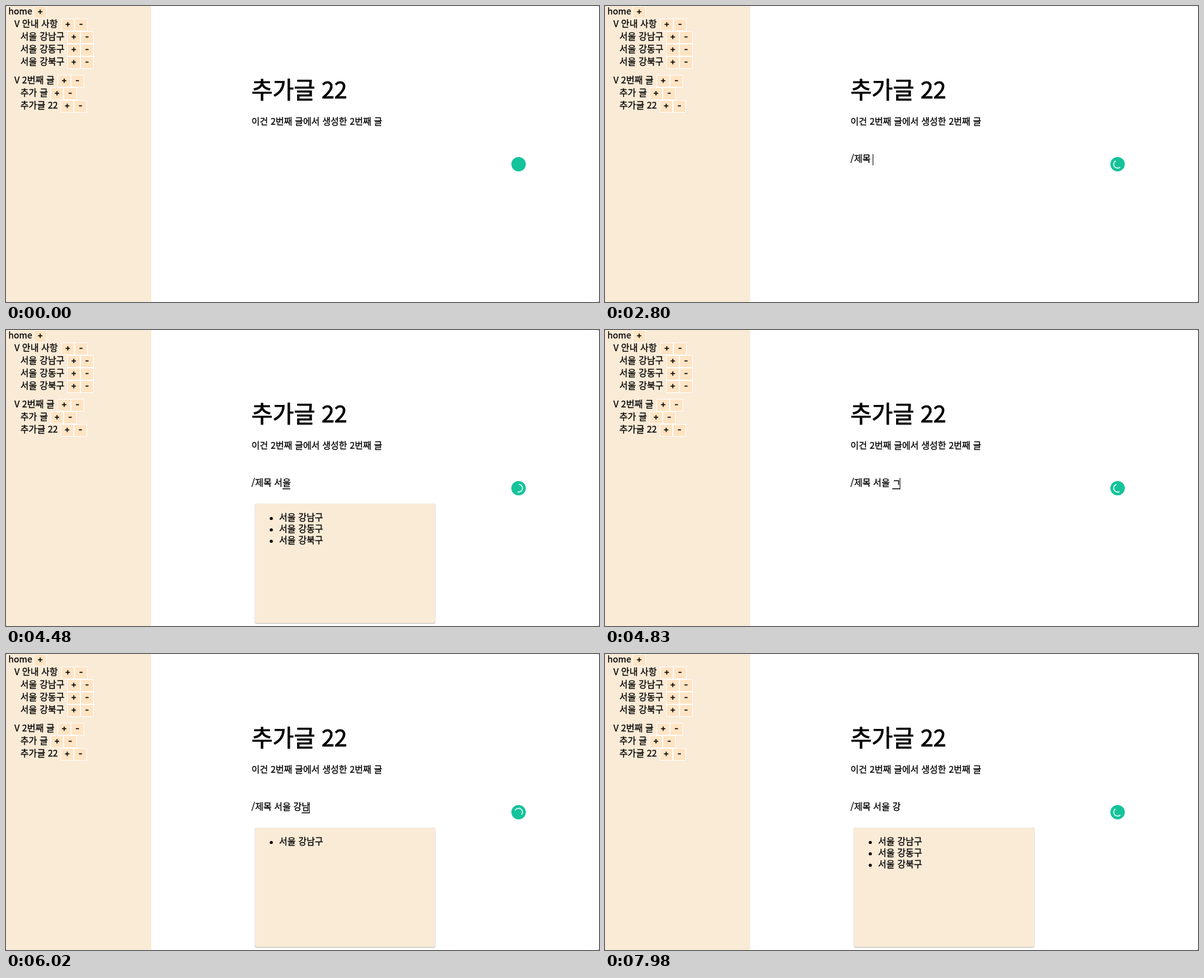
Write an HTML page that moves like this. It is 988 by 494 pixels and loops after 8000 ms.

```html
<!DOCTYPE html>
<html lang="ko">
<head>
<meta charset="utf-8">
<title>글 편집기</title>
<style>
  html, body { margin: 0; width: 100%; height: 100%; overflow: hidden; background: #777; }
  #page { position: relative; width: 988px; height: 494px; overflow: hidden; border-radius: 2px; background: #fff; }
  svg { position: absolute; left: 0; top: 0; }
  text {
    font: 15.05px "Noto Sans CJK KR", "Noto Sans KR", "Noto Sans CJK", sans-serif;
    fill: #000; stroke: #000; stroke-width: .3px; white-space: pre;
  }
  .title { font-size: 38.4px; stroke-width: .9px; }
  .home { font-size: 14.7px; }
  .sign { font: 500 14px Inter, sans-serif; text-anchor: middle; }
  .button { fill: bisque; stroke: #fff; }
  #popup {
    position: absolute; left: 415px; top: 290px; width: 300px; height: 199px;
    background: antiquewhite; border-radius: 3px;
    box-shadow: 0 1px 2px rgba(0, 0, 0, .28), 0 0 1px rgba(0, 0, 0, .3);
  }
</style>
</head>
<body>
<div id="page">
  <div id="popup"></div>
  <svg width="988" height="494" viewBox="0 0 988 494">
    <rect width="242" height="494" fill="antiquewhite"/>
    <g id="menu"></g>
    <text class="title" x="409" y="154">추가글 22</text>
    <text x="409" y="198">이건 2번째 글에서 생성한 2번째 글</text>
    <text id="typed" x="409" y="260.3"></text>
    <rect id="underline" y="264.3" height="1.5"/>
    <rect id="caret" width="1" height="19"/>
    <g id="list"></g>
    <circle cx="854" cy="264" r="12" fill="#15c39a"/>
    <path id="spinner" d="M860.5 264A6.5 6.5 0 0 1 847.5 264"
          fill="none" stroke="#fff" stroke-opacity=".85" stroke-width="1.8" stroke-linecap="round"/>
  </svg>
</div>
<script>
const LOOP = 8000, STEP = 70, BLINK = 500, EM = 15.1;
const $ = id => document.getElementById(id);

function add(parent, tag, attrs, content = "") {
  const el = document.createElementNS("http://www.w3.org/2000/svg", tag);
  for (const key in attrs) el.setAttribute(key, attrs[key]);
  el.textContent = content;
  parent.append(el);
  return el;
}

// label, text x, row y, first button x, button signs
const rows = [
  ["home", 4, 0, 46, "+"],
  ["V 안내 사항", 14, 21, 92, "+-"],
  ["서울 강남구", 24, 42, 102, "+-"],
  ["서울 강동구", 24, 63, 102, "+-"],
  ["서울 강북구", 24, 84, 102, "+-"],
  ["V 2번째 글", 14, 115, 86, "+-"],
  ["추가 글", 24, 136, 74, "+-"],
  ["추가글 22", 24, 157, 91, "+-"]
];
for (const [label, x, y, left, signs] of rows) {
  add($("menu"), "text", { x, y: y + 14, class: label === "home" ? "home" : "" }, label);
  [...signs].forEach((sign, i) => {
    const bx = left + i * 22;
    add($("menu"), "rect", { x: bx + .5, y: y + .5, width: 21, height: 20, class: "button" });
    add($("menu"), "text", { x: bx + 11, y: y + 13.7, class: "sign" }, sign);
  });
}

const districts = ["서울 강남구", "서울 강동구", "서울 강북구"];
const items = districts.map((name, i) => {
  const item = add($("list"), "g", {});
  add(item, "circle", { cx: 442, cy: 314.5 + i * 19, r: 2.6 });
  add(item, "text", { x: 455, y: 318.3 + i * 19 }, name);
  return item;
});

// time, text, whether the last syllable is still being composed
const edits = [
  [0, ""], [1680, "/"], [1960, "/ㅈ", 1], [2100, "/제", 1], [2240, "/젬", 1],
  [2380, "/제모", 1], [2520, "/제목", 1], [2800, "/제목 "], [3080, "/제목 ㅅ", 1],
  [3430, "/제목 서", 1], [3640, "/제목 성", 1], [3780, "/제목 서우", 1],
  [3920, "/제목 서울", 1], [4620, "/제목 서울 "], [4760, "/제목 서울 ㄱ", 1],
  [4900, "/제목 서울 가", 1], [5040, "/제목 서울 강", 1], [5250, "/제목 서울 강 "],
  [5600, "/제목 서울 강"], [5740, "/제목 서울 강ㄴ", 1], [5880, "/제목 서울 강나", 1],
  [5950, "/제목 서울 강남", 1], [6790, "/제목 서울 강나", 1], [6930, "/제목 서울 강ㄴ", 1],
  [7070, "/제목 서울 강"]
];
// time, x, y of the caret before typing starts
const clicks = [[350, 627, 185], [1330, 409, 216], [1540, 409, 247]];
// start, reference time, arc direction in degrees at that time
const spins = [[1680, 1820, 90], [3360, 3500, -45], [6720, 7980, 140]];

const latest = (list, t) => list.filter(entry => entry[0] <= t).pop();
const advance = { "/": .37, " ": .26 };
const widthOf = text => [...text].reduce((sum, c) => sum + (advance[c] || .92) * EM, 0);
const show = (el, on) => { el.style.display = on ? "" : "none"; };

function draw(now) {
  const t = Math.floor(now % LOOP / STEP) * STEP;
  const [editTime, text, composing] = latest(edits, t);
  const end = 409 + widthOf(text);
  $("typed").textContent = text;

  show($("underline"), composing);
  $("underline").setAttribute("x", end - 13.3);
  $("underline").setAttribute("width", 12.8);

  const click = text ? [editTime, Math.floor(end), 247] : latest(clicks, t);
  show($("caret"), click && (t - click[0]) % (2 * BLINK) <= BLINK);
  if (click) {
    $("caret").setAttribute("x", click[1]);
    $("caret").setAttribute("y", click[2]);
  }

  const query = text.slice(4);
  const matches = districts.map(name => query !== "" && name.startsWith(query));
  show($("popup"), matches.includes(true));
  items.forEach((item, i) => show(item, matches[i]));

  const spin = latest(spins, t);
  show($("spinner"), spin);
  if (spin) {
    const angle = spin[2] - 90 + (t - spin[1]) * 360 / 850;
    $("spinner").setAttribute("transform", `rotate(${angle} 854 264)`);
  }
}

let start;
function tick(now) {
  start ??= now;
  draw(now - start);
  requestAnimationFrame(tick);
}
draw(0);
requestAnimationFrame(tick);
</script>
</body>
</html>
```
